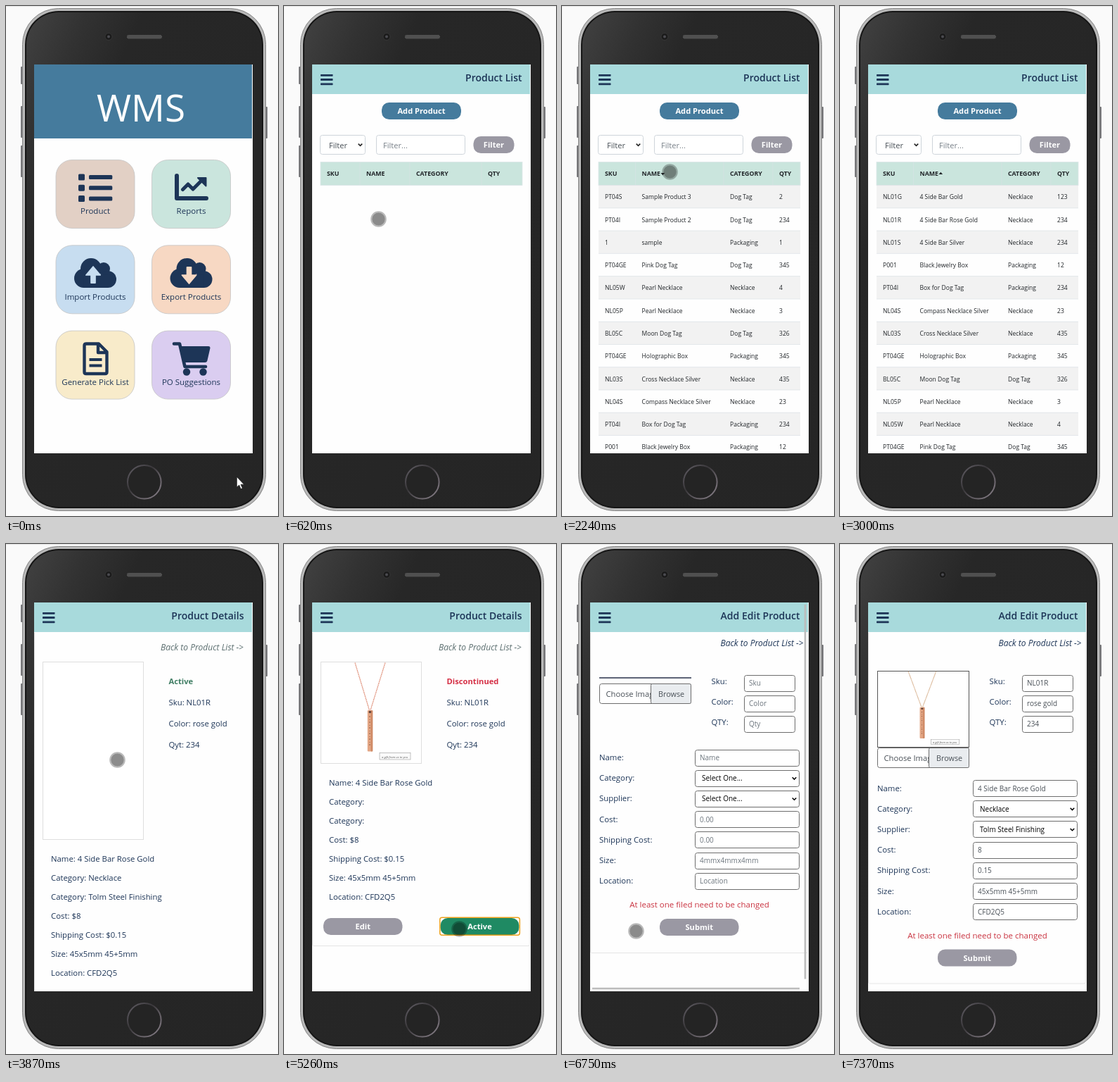
Animation of 387x724 px, one loop 8000 ms. Source, as an HTML page:

```html
<!DOCTYPE html>
<html lang="en">
<head>
<meta charset="utf-8">
<title>WMS</title>
<style>
html, body { margin: 0; width: 100%; height: 100%; overflow: hidden; background: #fafafa; }
svg { display: block; width: 100%; height: 100%; }
text { font-family: "Open Sans", "Noto Sans", sans-serif; }
</style>
</head>
<body>
<svg viewBox="0 0 387 724" xmlns="http://www.w3.org/2000/svg">
  <defs>
    <linearGradient id="shell" x1="0" y1="0" x2="1" y2="1">
      <stop offset="0" stop-color="#424242"/><stop offset=".13" stop-color="#323232"/>
      <stop offset=".25" stop-color="#272727"/><stop offset="1" stop-color="#252525"/>
    </linearGradient>
    <linearGradient id="ring" x1="0" y1="0" x2="1" y2="1">
      <stop offset="0" stop-color="#66626a"/><stop offset=".4" stop-color="#39373a"/>
      <stop offset=".6" stop-color="#5d585e"/><stop offset="1" stop-color="#8b838c"/>
    </linearGradient>
    <pattern id="mesh" width="2" height="2" patternUnits="userSpaceOnUse">
      <rect width="2" height="2" fill="#3a3a3a"/><rect width="1" height="1" fill="#666"/><rect x="1" y="1" width="1" height="1" fill="#666"/>
    </pattern>
    <clipPath id="screen"><rect x="40" y="83" width="310" height="552"/></clipPath>
    <clipPath id="file"><rect x="53" y="150" width="74" height="300"/></clipPath>
  </defs>
  <rect width="387" height="724" fill="#fafafa"/>
  <rect width="387" height="1" fill="#e4e4e4"/>
  <g fill="#77777a">
    <rect x="21" y="86" width="4" height="25" rx="1"/>
    <rect x="21" y="142" width="4" height="45" rx="1"/>
    <rect x="21" y="198" width="4" height="45" rx="1"/>
    <rect x="368" y="143" width="4" height="45" rx="1"/>
  </g>
  <rect x="23.5" y="3.5" width="346" height="713" rx="51" fill="#b9b9b9" stroke="#858585"/>
  <rect x="27" y="7" width="339" height="706" rx="48" fill="#151515"/>
  <rect x="29" y="9" width="335" height="702" rx="46" fill="url(#shell)"/>
  <circle cx="146" cy="43.5" r="5" fill="#1b1b1b" stroke="#3c3c3c" stroke-width=".8"/>
  <circle cx="146" cy="43.5" r="2" fill="#4b4b50"/>
  <rect x="172" y="41" width="50" height="5.5" rx="2.7" fill="url(#mesh)"/>
  <circle cx="196.8" cy="675.8" r="23.8" fill="#242424" stroke="url(#ring)" stroke-width="2"/>
  <rect x="40" y="83" width="311" height="552" fill="#fefefe"/>
  <g id="view" clip-path="url(#screen)"></g>
  <g id="pointer"></g>
</svg>
<script>
const LOOP = 8000;
const NAVY = '#1d3557', BLUE = '#457b9d', MINT = '#cae5dd', GREY = '#9a98a3';
const view = document.getElementById('view');
const pointer = document.getElementById('pointer');

const text = (x, y, s, size = 11.35, attrs = '') =>
  `<text x="${x}" y="${y}" font-size="${size}" fill="${NAVY}" ${attrs}>${s.replace('>', '&gt;')}</text>`;
const box = (x, y, w, h, r, fill, attrs = '') =>
  `<rect x="${x}" y="${y}" width="${w}" height="${h}" rx="${r}" fill="${fill}" ${attrs}/>`;
// Outlined box whose one-pixel border sits on whole pixels
const outlined = (x, y, w, h, r, stroke, fill = '#fff') =>
  box(Math.floor(x) + .5, Math.round(y) + .5, Math.round(w) - 1, Math.round(h) - 1, r, fill, `stroke="${stroke}"`);
const line = (d, color, width, attrs = '') =>
  `<path d="${d}" fill="none" stroke="${color}" stroke-width="${width}" ${attrs}/>`;
const dot = (x, y, r, fill = NAVY) => `<circle cx="${x}" cy="${y}" r="${r}" fill="${fill}"/>`;
const chevron = (x, y, color = '#222') => line(`M${x - 2.8} ${y - 1.4}l2.8 2.8 2.8-2.8`, color, 1.5);
const button = (x, y, w, label, fill) => box(x, y, w, 24, 10.5, fill) +
  text(x + w / 2, y + 16, label, 11.1, 'style="fill:#fff" font-weight="700" text-anchor="middle"');

// Home screen

const ROUND = 'stroke-linecap="round" stroke-linejoin="round"';

const cloud = (x, y, tile, dir) => {
  const tip = 288 + dir * 128, tail = 288 - dir * 118;
  return `<g transform="translate(${x} ${y}) scale(.09375)">` +
    dot(256, 192, 160) + dot(448, 192, 96) + dot(144, 336, 144) + dot(512, 352, 128) +
    box(144, 280, 368, 200, 0, NAVY) +
    `<path d="M180 288L288 ${tip} 396 288H320V${tail}H256V288z" fill="${tile}" stroke="${tile}" stroke-width="18" stroke-linejoin="round"/></g>`;
};

const listIcon = () => [238.5, 253.7, 269].map(y =>
  box(103, y, 9, 9, 1.6, NAVY) + box(118, y + 1.5, 33.3, 6, 1.5, NAVY)).join('');

const chartIcon = () => line('M243 241V273H285', NAVY, 6, ROUND) +
  line('M251.5 260.5L259 253 266 260 279 247', NAVY, 5, ROUND) +
  `<path d="M273 244H284.5V255.5z" fill="${NAVY}" stroke="${NAVY}" stroke-width="2" stroke-linejoin="round"/>`;

const fileIcon = () =>
  line('M113.5 479.5H132L143.5 491V519.5Q143.5 522 141 522H114Q111.5 522 111.5 519.5V482Q111.5 479.5 114 479.5M131 480V492H143', NAVY, 4.4, 'stroke-linejoin="round"') +
  line('M118.5 502H136.5M118.5 510.5H136.5', NAVY, 4);

const cartIcon = () => line('M239 479.5H247L254.5 512H284', NAVY, 4.6, ROUND) +
  `<path d="M249 483H288Q291 483 290.4 486L286.5 503Q286 506 283 506H254z" fill="${NAVY}"/>` +
  dot(257, 519.5, 5.2) + dot(280.5, 519.5, 5.2);

const TILES = [
  ['Product', '#e2d0c5', listIcon],
  ['Reports', MINT, chartIcon],
  ['Import Products', '#c7ddf0', c => cloud(97, 355, c, -1)],
  ['Export Products', '#f7d8c3', c => cloud(233.5, 355, c, 1)],
  ['Generate Pick List', '#f8ebca', fileIcon],
  ['PO Suggestions', '#dacdf0', cartIcon]
];

function home() {
  const tiles = TILES.map(([label, fill, icon], i) => {
    const x = 71 + (i % 2) * 136.5, y = 218.5 + (i >> 1) * 121.3;
    return box(x, y, 112, 97, 23, fill, 'stroke="#c4c4c4" stroke-width=".8"') + icon(fill) +
      text(x + 56, y + 76.7, label, 11.5, 'font-weight="500" text-anchor="middle"');
  });
  return box(40, 83, 310, 105, 0, BLUE) +
    text(192, 164, 'WMS', 53, 'style="fill:#fff" text-anchor="middle"') + tiles.join('');
}

const header = title => box(40, 83, 310, 42, 0, '#a8dadc') +
  [96.9, 103.1, 109.4].map(y => box(52, y, 17.5, 2.8, .6, NAVY)).join('') +
  text(338.5, 107, title, 14, 'font-weight="600" text-anchor="end"');

// Product list

const DESC = [
  ['PT04S', 'Sample Product 3', 'Dog Tag', 2],
  ['PT04I', 'Sample Product 2', 'Dog Tag', 234],
  ['1', 'sample', 'Packaging', 1],
  ['PT04GE', 'Pink Dog Tag', 'Dog Tag', 345],
  ['NL05W', 'Pearl Necklace', 'Necklace', 4],
  ['NL05P', 'Pearl Necklace', 'Necklace', 3],
  ['BL05C', 'Moon Dog Tag', 'Dog Tag', 326],
  ['PT04GE', 'Holographic Box', 'Packaging', 345],
  ['NL03S', 'Cross Necklace Silver', 'Necklace', 435],
  ['NL04S', 'Compass Necklace Silver', 'Necklace', 23],
  ['PT04I', 'Box for Dog Tag', 'Packaging', 234],
  ['P001', 'Black Jewelry Box', 'Packaging', 12],
  ['NL01S', '4 Side Bar Silver', 'Necklace', 234],
  ['NL01R', '4 Side Bar Rose Gold', 'Necklace', 234],
  ['NL01G', '4 Side Bar Gold', 'Necklace', 123]
];
const ASC = [...DESC].reverse();
const STORED = [14, 13, 12, 8, 9, 5, 4, 6, 3, 1, 0, 7, 10].map(i => DESC[i]);

function list(rows, sort) {
  const cols = rows ? [61, 113.5, 239, 309] : [61, 117, 188, 290];
  const cells = (values, y, size, attrs) =>
    values.map((v, i) => text(cols[i], y, String(v), size, attrs)).join('');
  let out = header('Product List') + button(139, 137, 113, 'Add Product', BLUE) +
    outlined(51, 183, 65, 28, 3, '#ced4da') +
    text(64, 202, 'Filter', 11.1, 'style="fill:#495057"') + chevron(108.5, 197) +
    outlined(131, 183, 127, 28, 3, '#ced4da') +
    text(141, 202, 'Filter...', 11.1, 'style="fill:#7a828a"') +
    button(269.5, 185, 58, 'Filter', GREY) +
    box(52, 221.5, 287, 33, 0, MINT, 'stroke="#dbe5e8" stroke-width=".8"') +
    cols.slice(1).map(x => line(`M${x - 9} 222V254`, '#d6e2e4', .8)).join('') +
    cells(['SKU', 'NAME', 'CATEGORY', 'QTY'], 241, 8.8, 'font-weight="700" style="fill:#212529"');
  if (sort) out += `<path d="M140.5 ${238 - sort}h5.6l-2.8 ${sort * 3.2}z" fill="#212529"/>`;
  (rows || []).slice(0, 12).forEach((row, i) => {
    const y = 254.5 + i * 32.28;
    out += box(52, y, 287, 32.28, 0, i % 2 ? '#fefefe' : '#f2f2f2') +
      line(`M52 ${y}H339`, '#dee2e6', .8) + cells(row, y + 19.8, 8.55, 'style="fill:#212529"');
  });
  return out;
}

// Product details

const SUPPLIER = 'Tolm Steel Finishing';

const necklace = (chain) =>
  line('M101 168.5L121.5 236M144 168.5L123 236', chain, 1.3, 'stroke-dasharray="2.2 .5"') +
  box(118.8, 236, 7.4, 58.5, 1.2, '#e3a684') + box(123.6, 236, 2.6, 58.5, 1, '#cf8a66') +
  line('M122 244V288', '#8d5a45', 1, 'stroke-dasharray="2 3 1 2"') + dot(122.3, 238.5, 1.7, '#5d4038') +
  box(136, 296.5, 44, 9.5, 0, '#fafafa', 'stroke="#999" stroke-width=".6"') +
  text(139, 303.5, 'a gift from us to you', 4.2, 'font-style="italic" style="fill:#555"');

const back = (x, y, color) =>
  text(x, y, 'Back to Product List ->', 12.05, `font-style="italic" style="fill:${color}" text-anchor="end"`);
const card = y => line(`M40.5 126V${y - 2}Q40.5 ${y} 43 ${y}H347Q349.5 ${y} 349.5 ${y - 2}V126`, '#e3e3e3', .9);

function details({ loaded, active, filled, focus }) {
  const top = loaded ? 343 : 451;
  const lines = ['Name: 4 Side Bar Rose Gold', 'Category: ' + (filled ? 'Necklace' : ''),
    'Category: ' + (filled ? SUPPLIER : ''), 'Cost: $8', 'Shipping Cost: $0.15',
    'Size: 45x5mm 45+5mm', 'Location: CFD2Q5'];
  let out = header('Product Details') + card(loaded ? 570.5 : 678) + back(338, 151, '#5c6f70') +
    outlined(52, 167, 144, loaded ? 145 : 253, 0, '#dedede') +
    (loaded ? necklace('#e39c88') : '') +
    text(231.5, 199, active ? 'Active' : 'Discontinued', 11.2,
      `font-weight="700" style="fill:${active ? '#3f7d63' : '#d52f45'}"`) +
    ['Sku: NL01R', 'Color: rose gold', 'Qyt: 234'].map((s, i) => text(231.5, 229 + i * 30, s)).join('') +
    lines.map((s, i) => text(64, top + i * 27, s)).join('');
  if (loaded) {
    out += button(56, 531, 112.5, 'Edit', active ? BLUE : GREY) +
      button(222.5, 531, 112, active ? 'Discontinue' : 'Active', active ? '#d52f45' : '#1f8a63');
    if (focus) out += box(221.8, 530.3, 113.6, 25, 3, 'none', 'stroke="#eda21c" stroke-width="1.5"');
  }
  return out;
}

// Edit form

const FIELDS = [
  ['Name:', 'Name', '4 Side Bar Rose Gold'],
  ['Category:', 'Select One...', 'Necklace', 1],
  ['Supplier:', 'Select One...', SUPPLIER, 1],
  ['Cost:', '0.00', '8'],
  ['Shipping Cost:', '0.00', '0.15'],
  ['Size:', '4mmx4mmx4mm', '45x5mm 45+5mm'],
  ['Location:', 'Location', 'CFD2Q5']
];
const SIDE = [['Sku:', 'Sku', 'NL01R'], ['Color:', 'Color', 'rose gold'], ['QTY:', 'Qty', '234']];

function form({ filled, image, bars }) {
  const drop = image ? 43.5 : 0, fileY = image ? 289 : 198;
  const field = (labelX, labelDy, x, w, y, [label, hint, value, select]) => {
    const color = select ? '#000' : filled ? '#495057' : '#6c757d';
    return text(labelX, Math.round(y) + labelDy, label) + outlined(x, y - .5, w, 24, 3, '#6d6d6d') +
      text(x + (select ? 10 : 7), Math.round(y) + 15, filled ? value : hint, 10, `style="fill:${color}"`) +
      (select ? chevron(x + w - 7.5, y + 11.5, '#000') : '');
  };
  let out = header('Add Edit Product') + card(580.5 + drop) + back(343.5, 145, NAVY);
  out += image
    ? outlined(53, 180, 131, 109, 0, '#555') +
      `<g transform="translate(53 180.5) scale(.92 .755) translate(-53 -168)">${necklace('#d9b594')}</g>`
    : line('M53 190H184', '#27304a', 1.6);
  out += outlined(53, fileY, 131, 29, 3, '#6d6d6d') +
    `<g clip-path="url(#file)">${text(62.5, fileY + 19, 'Choose Image', 11.2, 'style="fill:#495057"')}</g>` +
    outlined(126, fileY, 58, 29, 2, '#6d6d6d', '#e9ecef') +
    text(137, fileY + 19, 'Browse', 10.8, 'style="fill:#495057"') +
    SIDE.map((f, i) => field(212.5, 13, 259, 73, 186 + i * 29.2, f)).join('') +
    FIELDS.map((f, i) => field(53, 15, 189, 149, 292 + drop + i * 29.2, f)).join('') +
    text(195.5, 516 + drop, 'At least one filed need to be changed', 11.5,
      'style="fill:#c93340" text-anchor="middle"') +
    button(139, 532 + drop, 112.5, 'Submit', GREY);
  if (bars) out += line('M346 86V617.5M43 631H338', '#bcbcbc', 2.6);
  return out;
}

// Timeline

const touch = (x, y) =>
  `<circle cx="${x}" cy="${y}" r="9.3" fill="#000" fill-opacity=".45"/>` +
  `<circle cx="${x}" cy="${y}" r="10.3" fill="none" stroke="#000" stroke-opacity=".27" stroke-width="2"/>`;
const arrow = () =>
  '<path d="M328.4 668.4V683L331.7 680 334.2 685.6 336.4 684.6 334 679.2H338.6z" fill="#fff" stroke="#111" stroke-width=".6"/>';

const SCENES = [
  [0, home],
  [620, () => list()],
  [990, () => list(STORED)],
  [2240, () => list(DESC, 1)],
  [2850, () => list(ASC, -1)],
  [3870, () => details({ active: true, filled: true })],
  [4260, () => details({ loaded: true, active: true, filled: true })],
  [5260, () => details({ loaded: true, focus: true })],
  [5810, () => details({ loaded: true, active: true, focus: true })],
  [6750, () => form({ bars: true })],
  [7130, () => form({ filled: true, bars: true })],
  [7210, () => form({ filled: true, image: true, bars: true })],
  [7370, () => form({ filled: true, image: true })]
];
const none = () => '';
const POINTERS = [
  [0, arrow], [70, none],
  [620, () => touch(134.5, 302.5)], [830, none],
  [2240, () => touch(153.5, 235.5)], [2390, none],
  [2850, () => touch(157.5, 242.5)], [3000, none],
  [3870, () => touch(158.5, 306.5)], [4100, none],
  [5260, () => touch(249.5, 546.5)], [6200, none],
  [6750, () => touch(105.5, 549.5)], [7130, none]
];

const shown = new Map();
function show(node, steps, t) {
  const step = steps.findLast(([start]) => start <= t);
  if (shown.get(node) === step) return;
  shown.set(node, step);
  node.innerHTML = step[1]();
}

function render(now) {
  const t = now % LOOP;
  show(view, SCENES, t);
  show(pointer, POINTERS, t);
}

const begin = performance.now();
function tick() {
  render(performance.now() - begin);
  requestAnimationFrame(tick);
}
tick();
</script>
</body>
</html>
```
